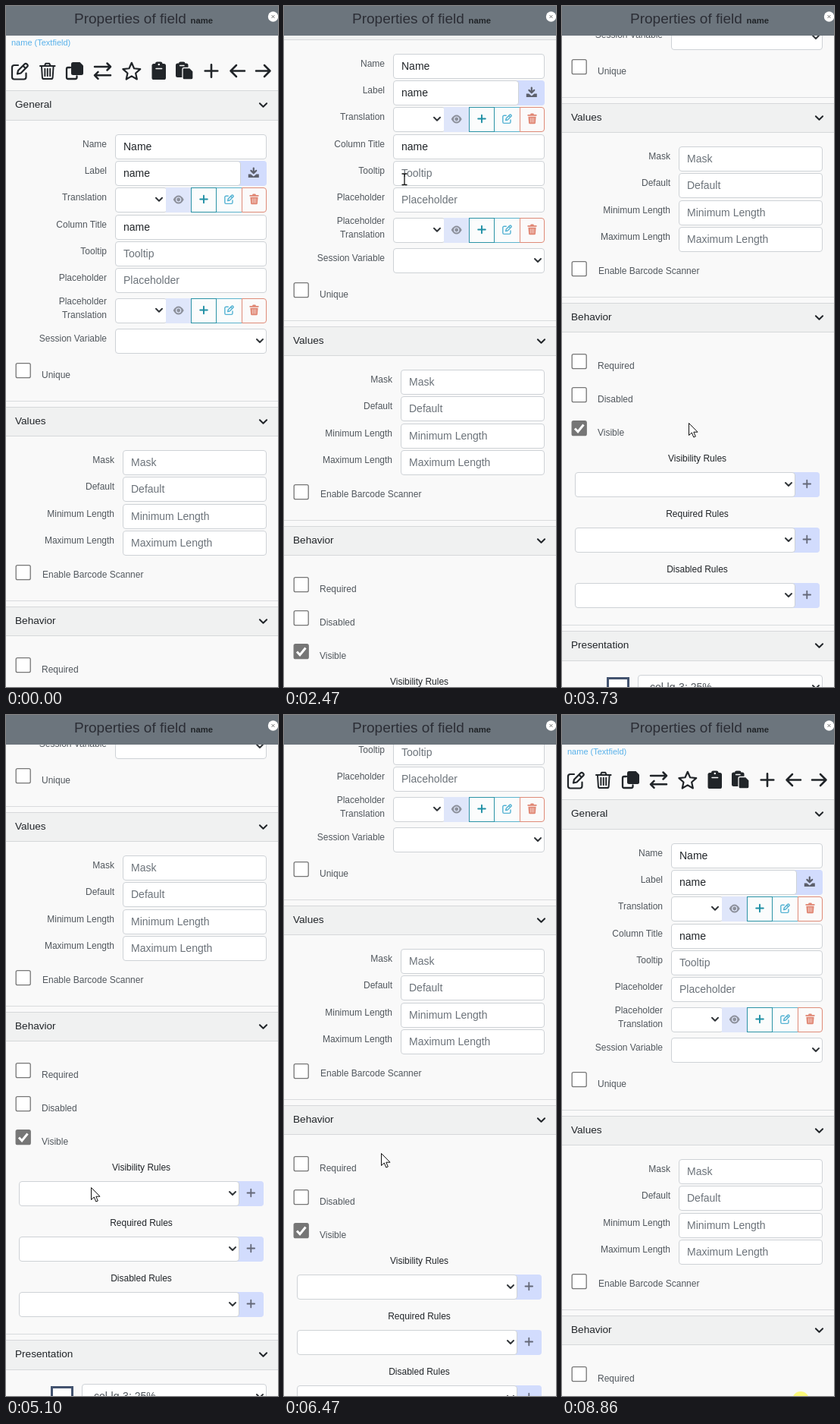
Recreate the animation shown at these times as an HTML page. Size 359 px wide and 897 px high, loop 8.99 s.

```html
<!DOCTYPE html>
<html lang="en">
<head>
<meta charset="utf-8">
<title>Field properties</title>
<style>
  html, body { margin: 0; width: 100%; height: 100%; overflow: hidden; background: #f9f9f9; }
  svg { display: block; width: 359px; height: 897px; font-family: "Liberation Sans", Arial, sans-serif; }
  .line { fill: none; stroke-linecap: round; stroke-linejoin: round; }
</style>
</head>
<body>
<svg id="stage" viewBox="0 0 359 897"></svg>
<script>
const LOOP = 8990, STEP = 70;
const INK = '#212529', LABEL = '#51575d', HINT = '#6c737a', BORDER = '#ced2d6', LILAC = '#d2dcfd';

// --- drawing helpers -------------------------------------------------------
const text = (x, y, str, size, fill, extra = '') =>
  `<text x="${x}" y="${y}" font-size="${size}" fill="${fill}" ${extra}>${str}</text>`;
const rect = (x, y, w, h, fill, extra = '') =>
  `<rect x="${x}" y="${y}" width="${w}" height="${h}" fill="${fill}" ${extra}/>`;
const line = (d, color, width) =>
  `<path class="line" d="${d}" stroke="${color}" stroke-width="${width}"/>`;
const shape = (d, fill) => `<path d="${d}" fill="${fill}"/>`;
const at = (x, y, scale, body) => `<g transform="translate(${x} ${y}) scale(${scale})">${body}</g>`;
const plus = (x, y, r, color, width) => line(`M${x - r} ${y}h${2 * r}M${x} ${y - r}v${2 * r}`, color, width);
const chevron = (x, y, r, color = '#33373b') => line(`M${x - r} ${y - r / 2}l${r} ${r}l${r} ${-r}`, color, 2);

// --- icons -----------------------------------------------------------------
const editIcon = (color, width) => line(
  'M9.5 4H4.5A3 3 0 0 0 1.5 7V19.5A3 3 0 0 0 4.5 22.5H17A3 3 0 0 0 20 19.5V14.5' +
  'M8.5 15.5 9.5 11 18 2.5Q19.5 1 21 2.5L21.5 3Q23 4.5 21.5 6L13 14.5ZM16 4.8 19.2 8', color, width);

const smallTrash = (x, y) => at(x, y, 1,
  shape('M0 1.5h3.5l.8-1.5h3.4l.8 1.5H12v1.7H0zM.9 4.2h10.2l-.7 8.3q-.1 1.2-1.3 1.2H2.9q-1.2 0-1.3-1.2z', '#e08572') +
  line('M3.8 6.2v5.5M6 6.2v5.5M8.2 6.2v5.5', '#f6ddd7', 0.9));

const eye = (x, y) =>
  shape(`M${x - 7} ${y}Q${x - 4} ${y - 5.5} ${x} ${y - 5.5}T${x + 7} ${y}Q${x + 4} ${y + 5.5} ${x} ${y + 5.5}T${x - 7} ${y}`, '#8c909b') +
  `<circle cx="${x}" cy="${y}" r="3.6" fill="#dfe6fa"/><circle cx="${x}" cy="${y}" r="2.4" fill="#8c909b"/>`;

const download = (x, y) =>
  line(`M${x} ${y - 6}v6M${x - 3.4} ${y - 2.6}l3.4 3.4l3.4 -3.4`, '#5d606c', 2.2) +
  shape(`M${x - 7} ${y + 2}h3.4l3.6 3l3.6 -3h3.4v4.6h-14z`, '#5d606c');

const star = (cx, cy, outer, inner) => {
  const points = Array.from({ length: 10 }, (_, i) => {
    const r = i % 2 ? inner : outer, a = i * Math.PI / 5 - Math.PI / 2;
    return `${(cx + r * Math.cos(a)).toFixed(2)} ${(cy + r * Math.sin(a)).toFixed(2)}`;
  });
  return line(`M${points.join('L')}Z`, INK, 2.2);
};

const toolbar = () =>
  at(6.5, 74, 1, editIcon(INK, 2.2)) +
  at(44, 74, 0.98, line('M1 5H21M7 5 8.5 1.8H13.5L15 5M3 5 4 20.5Q4.2 22.5 6 22.5H16Q17.8 22.5 18 20.5L19 5M7.5 9V18.5M11 9V18.5M14.5 9V18.5', INK, 2)) +
  line('M85 81H82Q80 81 80 83V94Q80 96 82 96H91.5Q93.5 96 93.5 94V92.5', INK, 2.3) +
  shape('M88.5 74H97.5L102 78.5V88.5Q102 91 99.5 91H88.5Q86 91 86 88.5V76.5Q86 74 88.5 74Z', INK) +
  line('M117 80H138M133.5 75.5L138 80L133.5 84.5M138 91.3H117M121.5 86.8L117 91.3L121.5 95.8', INK, 2.5) +
  star(165.8, 86.8, 12, 5.6) +
  rect(192.5, 76, 18.5, 21, INK, 'rx="2.6"') + rect(197, 73.6, 9.5, 6, INK, 'rx="2.5"') +
  '<circle cx="201.8" cy="77" r="1.3" fill="#f9f9f9"/>' + line('M198 82.5h7.6', '#f9f9f9', 1.5) +
  rect(224, 75.5, 16.5, 18.5, INK, 'rx="2.5"') + rect(228, 73.6, 8.5, 5, INK, 'rx="2.3"') +
  line('M229.5 78.5h5.5', '#f9f9f9', 1.4) +
  `<path d="M235 81.5H242.5L247 86V94.5Q247 97 244.5 97H235Q233 97 233 94.5V83.5Q233 81.5 235 81.5Z" fill="${INK}" stroke="#f9f9f9" stroke-width="1.3"/>` +
  plus(271, 85.5, 8.3, INK, 2.6) +
  line('M315 85.5H296.5M304 78L296.5 85.5L304 93', INK, 2.5) +
  line('M330 85.5H348.5M341 78L348.5 85.5L341 93', INK, 2.5);

// --- form parts ------------------------------------------------------------
const inputs = [];
const box = (x, y, w, extra = 'rx="3.5"') => rect(x + .5, y + .5, w - 1, 32, '#fff', `stroke="${BORDER}" ${extra}`);
const label = (right, y, str) => text(right, y, str, 12, LABEL, 'text-anchor="end"');

function input(x, y, str, color = HINT, right = 344) {
  inputs.push([x, y, right, y + 33]);
  return box(x, y, right - x) + text(x + 11, y + 21, str, 14, color);
}

const select = (x, y, right) => box(x, y, right - x) + chevron(right - 9, y + 16, 4);

const translation = y =>
  box(144, y, 69) + chevron(202, y + 15.8, 4) +
  rect(211, y, 33.5, 33, '#dfe6fa') + eye(227.7, y + 16) +
  rect(277.5, y + .5, 34, 32, '#fbfcfc', 'stroke="#5db4cd"') +
  `<path d="M311.5 ${y + .5}h28.5q3.5 0 3.5 3.5v25q0 3.5 -3.5 3.5h-28.5z" fill="#fbfafa" stroke="#df8b78"/>` +
  rect(244.5, y + .5, 33, 32, '#fbfcfc', 'stroke="#2b93a6"') +
  plus(261, y + 15.5, 4.8, '#1f8fa4', 1.9) +
  at(288, y + 9, .55, editIcon('#55b3d3', 2.6)) + smallTrash(321.5, y + 8.5);

const section = (y, str, h = 38) =>
  rect(-1, y + .5, 361, h, '#f0f1f1', 'stroke="#d6d8da"') +
  text(12, y + 23, str, 13.6, INK) + chevron(339.5, y + 19.5, 4.6, INK);

const divider = y => rect(0, y, 359, 1, '#d9dbdd');

const checkbox = (y, str, x = 47, textY = y + 20, checked = false) =>
  rect(13.2, y + .7, 19, 19, checked ? '#767676' : '#fff', 'rx="2" stroke="#767676" stroke-width="1.3"') +
  (checked ? `<path d="M17 ${y + 10.5}l4 4.2l7.5 -9.2" fill="none" stroke="#fff" stroke-width="3"/>` : '') +
  text(x, textY, str, 12, LABEL);

const rule = (y, str) =>
  text(178.5, y - 14.5, str, 12, INK, 'text-anchor="middle"') +
  rect(300, y, 40, 33, LILAC, 'rx="4"') + select(17, y, 308) + plus(323.3, y + 15.5, 4.8, '#646878', 1.8);

const page = () => [
  text(7, 52, 'name (Textfield)', 11, '#58b1ea'),
  toolbar(),
  section(111, 'General', 39),
  label(133, 186, 'Name'), input(144, 169, 'Name', INK),
  label(133, 221, 'Label'), rect(300, 204, 44, 33, LILAC, 'rx="4"'), input(144, 204, 'name', INK, 310), download(326.8, 219.5),
  label(133, 256, 'Translation'), translation(239),
  label(133, 292, 'Column Title'), input(144, 275, 'name', INK),
  label(133, 327, 'Tooltip'), input(144, 310, 'Tooltip'),
  label(133, 362, 'Placeholder'), input(144, 345, 'Placeholder'),
  label(133, 393, 'Placeholder'), label(133, 411, 'Translation'), translation(385),
  label(133, 442, 'Session Variable'), select(144, 425, 344),
  checkbox(470, 'Unique'), divider(520),
  section(528, 'Values'),
  ...['Mask', 'Default', 'Minimum Length', 'Maximum Length'].map((name, i) => {
    const y = Math.round(585 + 35.3 * i);
    return label(143, y + 17, name) + input(154, y, name);
  }),
  checkbox(736, 'Enable Barcode Scanner', 48, 753), divider(783),
  section(791, 'Behavior'),
  checkbox(858, 'Required'), checkbox(902, 'Disabled'), checkbox(946, 'Visible', 47, 966, true),
  rule(1014, 'Visibility Rules'), rule(1087, 'Required Rules'), rule(1160, 'Disabled Rules'),
  divider(1215),
  section(1223, 'Presentation', 39),
  rect(60.5, 1285.5, 27, 27, '#fff', 'stroke="#43536f" stroke-width="3"'),
  select(100, 1281, 344), text(116, 1302, 'col-lg-3: 25%', 14, LABEL)
].join('');

const titleBar = () =>
  rect(0, 0, 359, 39, '#6c757d') +
  text(90, 23, 'Properties of field', 19, '#2b2d35') +
  text(243.5, 23, 'name', 11.3, INK, 'font-weight="bold"') +
  '<circle cx="352.5" cy="14" r="6.7" fill="#fff"/>' + line('M350.8 12.3l3.4 3.4m0 -3.4l-3.4 3.4', '#777', 1);

const stage = document.getElementById('stage');
stage.innerHTML =
  rect(0, 0, 359, 897, '#f9f9f9') + `<g id="page">${page()}</g>` + titleBar() +
  '<circle id="click" cx="315" cy="902" r="11" fill="#fdfa7c"/>' +
  '<path id="arrow" d="M.5 .5V16.5L4.3 13 6.8 19 9.3 18 6.8 12.2H12Z" fill="#fff" stroke="#111" stroke-linejoin="round"/>' +
  '<path id="beam" class="line" d="M-3 -7h2.2L0 -6.2L.8 -7H3M0 -6.2V6.7M-3 7.5h2.2L0 6.7L.8 7.5H3" stroke="#111" stroke-width="1.3"/>';
const [pageEl, clickEl, arrowEl, beamEl] = ['page', 'click', 'arrow', 'beam'].map(id => document.getElementById(id));

// --- motion ----------------------------------------------------------------
const bursts = [0, 190, 1010, 1980, 2890, 3590, 4490, 4830, 5100, 6060, 6960, 7430, 8390];

const scrollKeys = [[2080, 0], [2470, 106], [2960, 303], [3300, 400], [5700, 400], [6200, 350], [6410, 277], [6890, 0]];

const pointerKeys = [
  [190, 309, 865], [400, 232, 560], [680, 150, 216], [940, 150, 216],
  [1220, 120, 192], [1500, 174, 238], [1780, 158.5, 228], [2470, 158.5, 228],
  [2960, 120, 353], [3310, 150, 515], [3520, 150, 515], [3800, 172, 560], [4080, 86, 600],
  [4420, 108, 621], [4630, 110, 625], [4760, 110, 625], [4900, 112, 625], [5030, 112, 625],
  [5100, 112, 622], [5700, 128, 577], [6890, 128, 577], [6960, 128, 576], [7360, 128, 576],
  [7640, 165, 310], [7850, 220, 135], [8060, 285, 330], [8200, 276, 620], [8320, 262, 793], [8390, 271, 837]
];

function sample(keys, t) {
  const next = keys.findIndex(k => k[0] > t);
  if (next === 0) return keys[0].slice(1);
  if (next < 0) return keys[keys.length - 1].slice(1);
  const a = keys[next - 1], b = keys[next], p = (t - a[0]) / (b[0] - a[0]);
  return a.slice(1).map((v, i) => v + (b[i + 1] - v) * p);
}

// Movement advances in short even steps counted from the start of each burst.
function stepped(t) {
  const start = bursts.filter(b => b <= t).pop();
  return start + Math.floor((t - start) / STEP) * STEP;
}

const show = (el, on) => el.setAttribute('visibility', on ? 'visible' : 'hidden');

function render(t) {
  const time = stepped(t);
  const scroll = Math.round(sample(scrollKeys, time)[0]);
  const [x, y] = sample(pointerKeys, time).map(Math.round);
  const visible = t >= 190 && t < 8460;
  const overInput = y > 39 && inputs.some(([l, top, r, bottom]) =>
    x >= l && x < r && y + scroll >= top && y + scroll < bottom);

  pageEl.setAttribute('transform', `translate(0 ${-scroll})`);
  arrowEl.setAttribute('transform', `translate(${x} ${y})`);
  beamEl.setAttribute('transform', `translate(${x} ${y})`);
  show(arrowEl, visible && !overInput);
  show(beamEl, visible && overInput);
  show(clickEl, t >= 8860);
}

const begin = performance.now();
function tick() {
  render((performance.now() - begin) % LOOP);
  requestAnimationFrame(tick);
}
tick();
</script>
</body>
</html>
```
